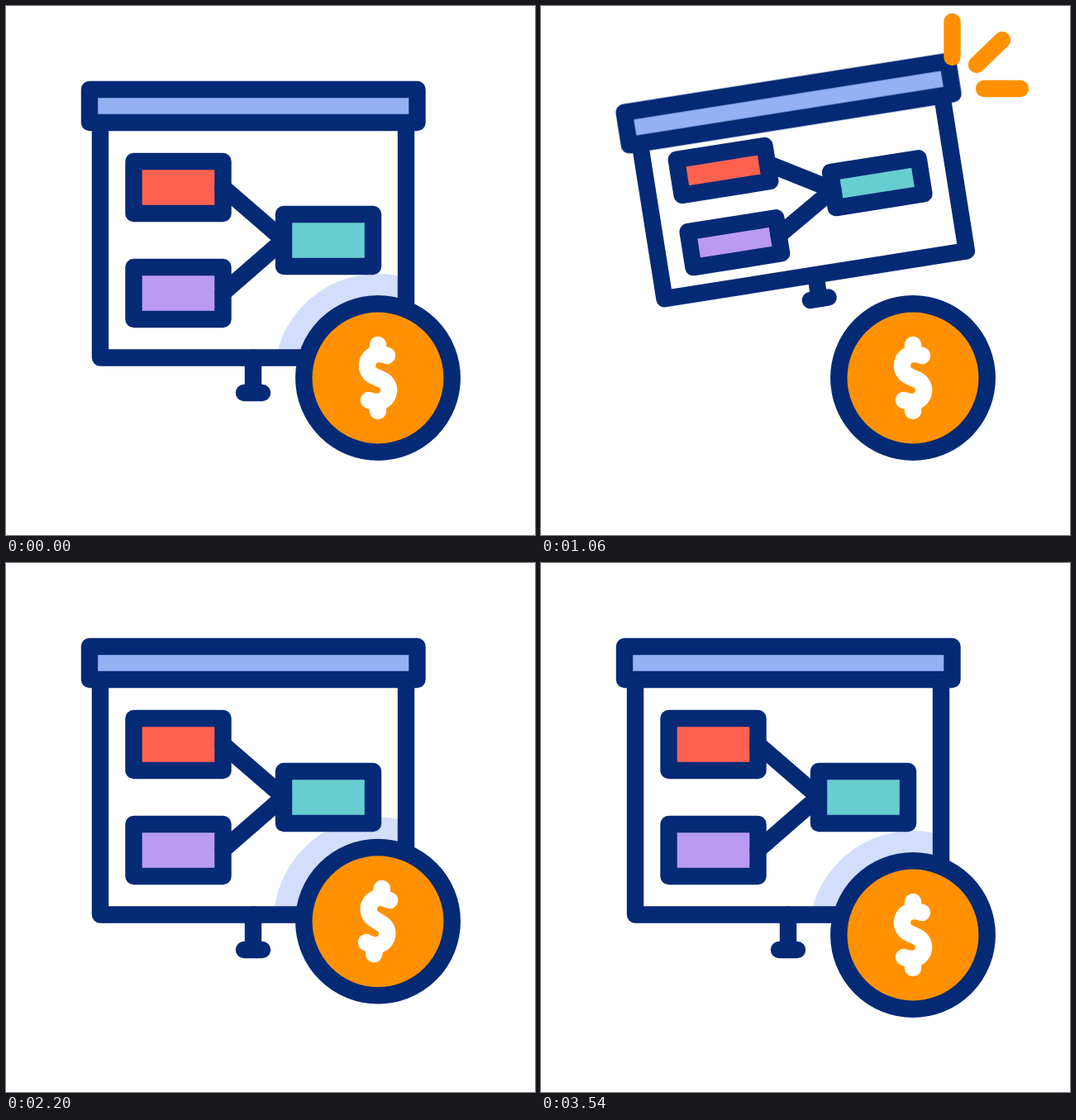
An HTML page without scripts for the animation above (3.6 s loop, 640x640 px).

```html
<!DOCTYPE html>
<html lang="en">
<head>
<meta charset="utf-8">
<title>Presentation and coin</title>
<style>
  html, body { margin: 0; width: 100%; height: 100%; overflow: hidden; background: #fff; }
  svg { display: block; width: 100vw; height: 100vh; }

  .ink { stroke: #042a76; stroke-width: 20.4; stroke-linecap: round; stroke-linejoin: round; }
  .ink rect, .ink path, #frames rect { vector-effect: non-scaling-stroke; }

  /* The header swings; everything hanging from it also stretches. */
  .swing, .hang {
    transform-origin: 299.5px 121px;
    animation: swing 3.6s cubic-bezier(.37, 0, .63, 1) infinite;
  }
  .hang { animation-name: swing, stretch; }
  @keyframes swing {
    0%, 42.2%, 100% { translate: 0 0; rotate: 0deg; }
    22.22% { translate: -1.5px 38px; rotate: 3deg; }
    29.6% { translate: .3px -3.5px; rotate: -9deg; }
  }
  @keyframes stretch {
    0%, 42.2%, 100% { scale: 1 1; }
    22.22% { scale: 1 1.265; }
    29.6% { scale: 1 .69; }
  }

  .bob { animation: bob 3.6s cubic-bezier(.37, 0, .63, 1) infinite; }
  @keyframes bob {
    0%, 35.19% { translate: 0 0; }
    42.59% { translate: 0 62px; }
    50% { translate: 0 -67px; }
    54.86% { translate: 0 0; animation-timing-function: cubic-bezier(.33, .67, .67, 1); }
    62.6% { translate: 0 -17px; animation-timing-function: cubic-bezier(.33, 0, .67, .33); }
    70.37%, 100% { translate: 0 0; }
  }

  .tilt {
    transform-origin: 450px 450px;
    animation: tilt 3.6s cubic-bezier(.37, 0, .63, 1) infinite;
  }
  @keyframes tilt {
    0%, 35.19%, 85%, 100% { rotate: 0deg; }
    42.59% { rotate: 23deg; }
    50% { rotate: -20deg; }
    68.9% { rotate: 22deg; }
    76.7% { rotate: -10deg; }
  }

  .blink { stroke: #ff9100; stroke-width: 23; animation: blink 3.6s linear infinite; }
  @keyframes blink {
    0%, 67.78%, 73.53%, 80.2%, 85.9%, 92.58%, 98.33%, 100% { opacity: 0; }
    69.17%, 72.58%, 81.5%, 85%, 94%, 97.42% { opacity: 1; }
  }

  .spark {
    fill: none; stroke: #ff9100; stroke-width: 20.4; stroke-linecap: round;
    stroke-dasharray: 1 3;
    animation: spark 3.6s linear infinite;
  }
  @keyframes spark {
    0%, 26.6% { stroke-dashoffset: 1; opacity: 0; }
    26.7% { stroke-dashoffset: 1; opacity: 1; }
    29.2%, 30.8% { stroke-dashoffset: 0; opacity: 1; }
    33.8% { stroke-dashoffset: -.98; opacity: 1; }
    33.9%, 100% { stroke-dashoffset: -1; opacity: 0; }
  }
</style>
</head>
<body>
<svg viewBox="0 0 640 640">
  <defs>
    <clipPath id="inScreen"><rect class="hang" x="114" y="121" width="370" height="304.5"/></clipPath>
    <clipPath id="inTeal"><rect class="hang" x="336" y="252" width="108" height="63"/></clipPath>
    <g id="frames" fill="none">
      <rect x="154.5" y="188" width="108" height="63"/>
      <rect x="154.5" y="316" width="108" height="63"/>
      <rect x="336" y="252" width="108" height="63"/>
    </g>
  </defs>

  <!-- shade cast by the coin on the screen -->
  <g clip-path="url(#inScreen)"><circle class="bob" cx="450" cy="450" r="126" fill="#d3ddfc"/></g>

  <!-- card fills -->
  <g class="hang">
    <rect x="154.5" y="188" width="108" height="63" fill="#ff6151"/>
    <rect x="154.5" y="316" width="108" height="63" fill="#bb9af3"/>
    <rect x="336" y="252" width="108" height="63" fill="#68cdd1"/>
  </g>
  <g clip-path="url(#inTeal)"><circle class="bob" cx="450" cy="450" r="126" fill="#28a0cf"/></g>

  <!-- screen, stand and diagram -->
  <g class="hang ink" fill="none">
    <rect x="114" y="121" width="370" height="304.5"/>
    <path d="M299 425.5V468M288 468H310"/>
    <path d="M262.5 219.5L336 283L262.5 347"/>
    <use href="#frames"/>
    <g class="blink"><use href="#frames"/></g>
  </g>

  <g class="swing ink">
    <rect x="101" y="101" width="396.5" height="40" fill="#94b1f4"/>
  </g>

  <path class="spark" pathLength="1" d="M497.5 62V19"/>
  <path class="spark" pathLength="1" d="M527 71L558 41"/>
  <path class="spark" pathLength="1" d="M536 100H580"/>

  <g class="bob">
    <circle cx="450" cy="450" r="89.7" fill="#ff9100" stroke="#042a76" stroke-width="20.5"/>
    <g class="tilt" fill="none" stroke="#fff" stroke-width="20.4" stroke-linecap="round" stroke-linejoin="round">
      <path d="M461 423Q456 421 451 421A14 14 0 0 0 445 447.7L455 452.3A14 14 0 0 1 449 479Q444 479 439 477"/>
      <path d="M450 410V420M450 490V480"/>
    </g>
  </g>
</svg>
</body>
</html>
```
